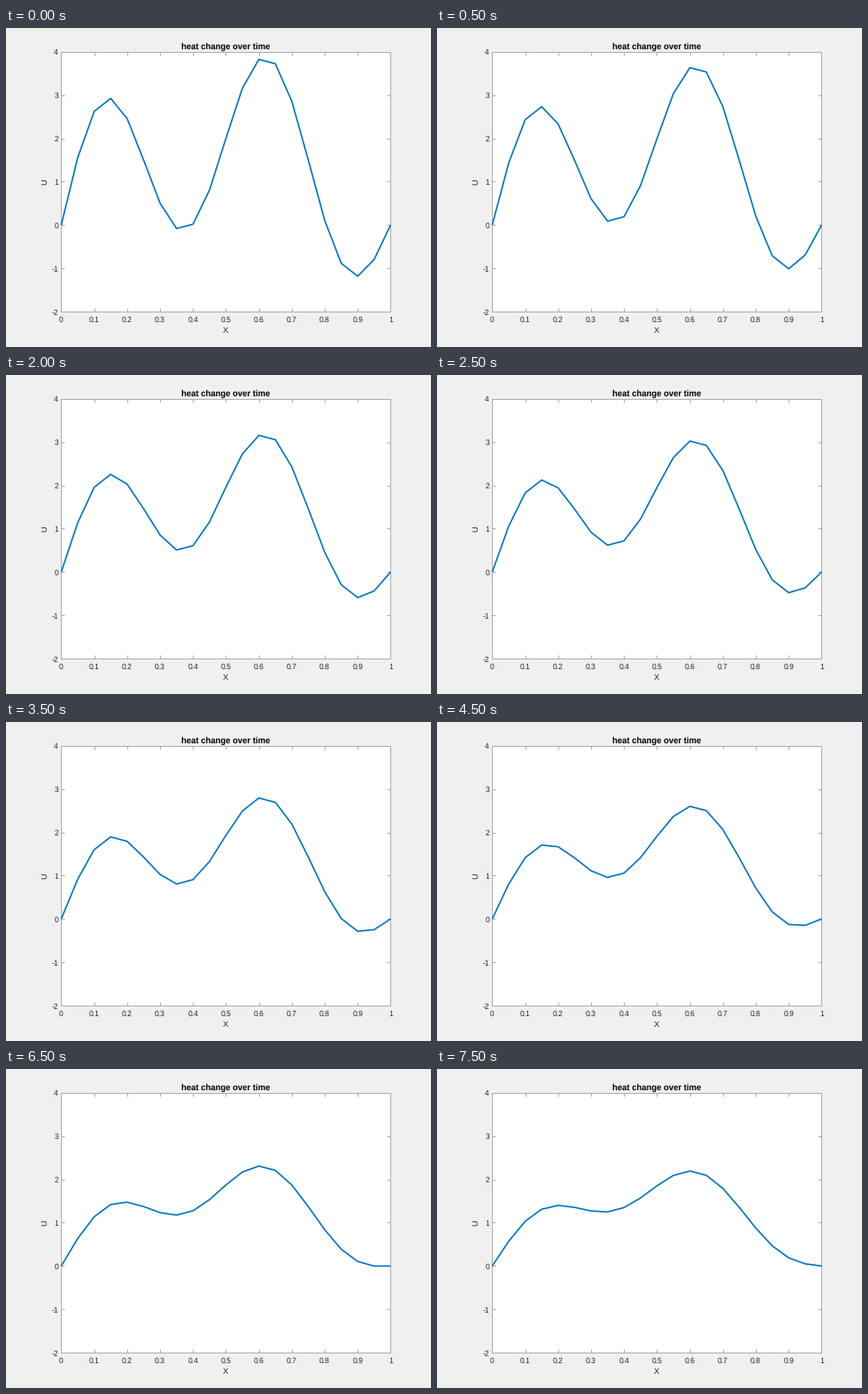
A matplotlib script that plays this animation: 480 px wide and 360 px high, repeating every 8 s.

```python
import numpy as np
import matplotlib.pyplot as plt
from matplotlib.animation import FuncAnimation

W, H, DPI = 480, 360, 80
PT = 72 / DPI  # points per pixel
FRAMES, STEP_MS = 16, 500
R = 0.25  # diffusion number of the explicit scheme
INK = (0.15,) * 3
RULE = (0.68,) * 3

plt.rcParams.update({"font.family": "Liberation Sans", "text.hinting": "none"})

x = np.linspace(0, 1, 21)


def heat(n):
    """Rod temperature after n explicit time steps."""
    u = 8 * x * (1 - x) + 2 * np.sin(4 * np.pi * x)
    u[0] = u[-1] = 0
    for _ in range(n):
        u[1:-1] += R * (u[2:] - 2 * u[1:-1] + u[:-2])
    return u


fig = plt.figure(figsize=(W / DPI, H / DPI), dpi=DPI, facecolor=(0.94,) * 3)
ax = fig.add_axes([0.13, 0.1108, 0.775, 0.815])
ax.set(xlim=(0, 1), ylim=(-2, 4),
       xticks=np.linspace(0, 1, 11), yticks=range(-2, 5))
ax.tick_params(direction="in", top=True, right=True, length=3.7 * PT,
               width=PT, color=RULE, labelbottom=False, labelleft=False)
for spine in ax.spines.values():
    spine.set(linewidth=PT, edgecolor=RULE)


def label(px, py, text, size=8.57, color=INK, **kw):
    """Text with its baseline at a pixel position measured from the top left."""
    kw = {"ha": "center", "va": "baseline", **kw}
    fig.text(px / W, 1 - py / H, text, fontsize=size * PT, color=color, **kw)


for i in range(11):
    label(62.4 + 37.2 * i, 332, f"{i / 10:g}")
for v in range(-2, 5):
    label(59, 30.2 + 48.9 * (4 - v), str(v), ha="right")
label(248.4, 23.5, "heat change over time", 9.5, "black", weight="bold")
label(248.4, 344.3, "X", 9.43)
label(46.3, 173.5, "U", 9.43, rotation=90, rotation_mode="anchor")

line, = ax.plot(x, heat(0), color="#0072BD", lw=1.65 * PT, zorder=3,
                clip_on=False, solid_joinstyle="round", solid_capstyle="butt")


def update(n):
    line.set_ydata(heat(n))
    return line,


anim = FuncAnimation(fig, update, frames=FRAMES, interval=STEP_MS,
                     repeat=True, repeat_delay=0)
plt.show()
```
